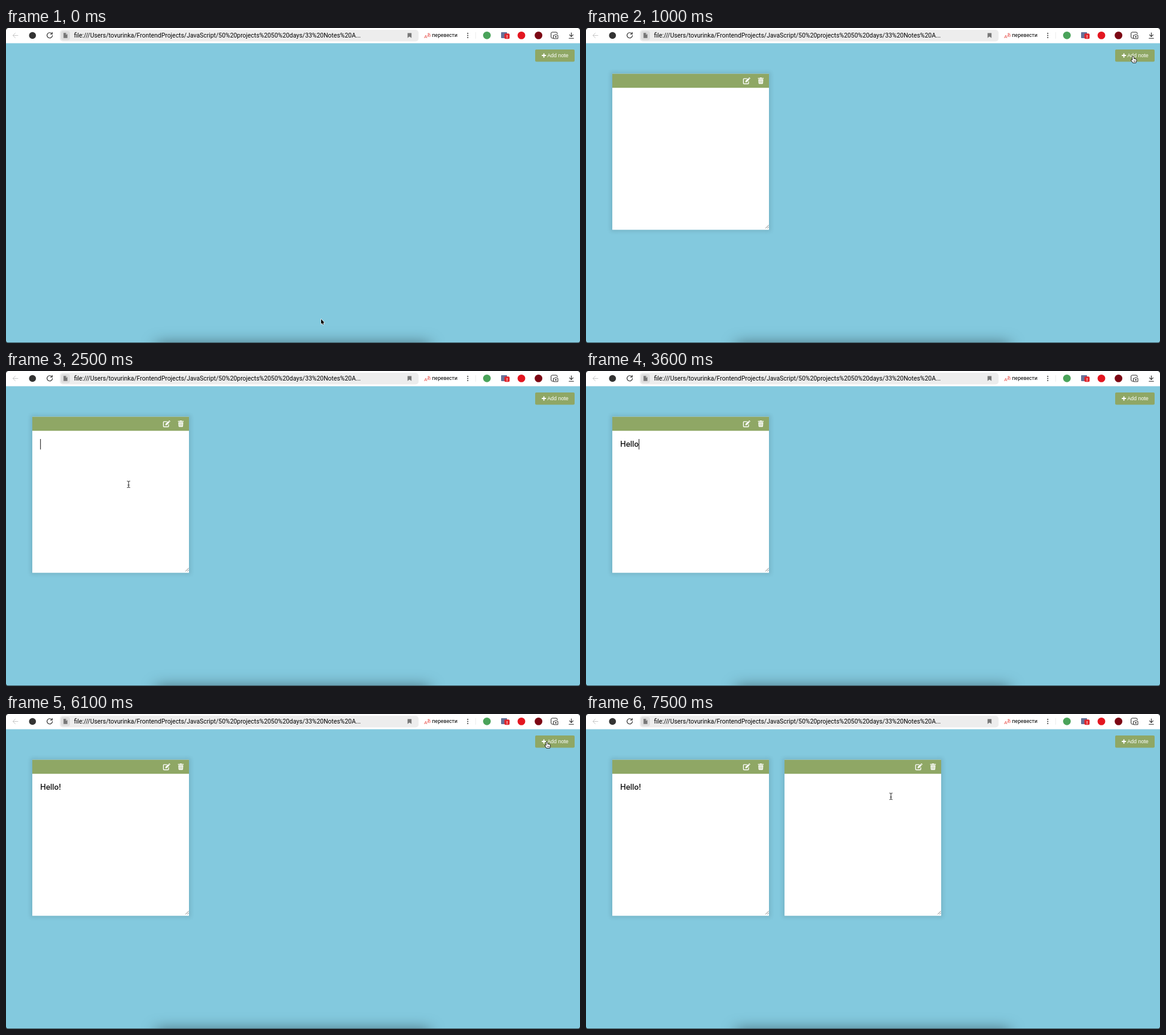
Recreate the animation shown at these times as an HTML page with a canvas. Size 960 by 528 pixels, loop 8000 ms.

```html
<!DOCTYPE html>
<html lang="en">
<head>
<meta charset="utf-8">
<title>Notes</title>
<style>
  html, body { margin: 0; width: 100%; height: 100%; overflow: hidden; background: #83c9de; }
  canvas { display: block; width: 960px; height: 528px; }
</style>
</head>
<body>
<canvas id="stage" width="960" height="528"></canvas>
<script>
const ctx = document.getElementById('stage').getContext('2d');
const LOOP = 8000, TICK = 100;
const GREEN = '#8fa765', INK = '#2b2b2b';
const UI = 'Roboto, sans-serif', NOTE_FONT = '500 12.7px Inter, sans-serif';

const NOTES = [{ x: 44, born: 1000 }, { x: 332, born: 6200 }];

// Each move: start, end, then the three control points of a quadratic curve.
const MOVES = [
  [0, 800, 527, 488, 740, 240, 915, 48],
  [1300, 1900, 915, 48, 620, 140, 225, 212],
  [1900, 2100, 225, 212, 208, 204, 205, 190],
  [4600, 4900, 205, 190, 281, 190, 480, -20],
  [5200, 6000, 600, -20, 740, 40, 904.6, 47],
  [6300, 7000, 904.6, 47, 700, 100, 510, 138]
];

const KEYS = [2700, 3000, 3200, 3400, 3600, 4200];
const GREETING = 'Hello!';

// Caret visibility as [on, off] spans.
const CARET_1 = [[2100, 2600], [2700, 4100], [4200, 4700], [5200, 5700]];
const CARET_2 = [[7000, 7500]];

const within = (t, spans) => spans.some(([a, b]) => t >= a && t < b);

function box(x, y, w, h, color, r = 0) {
  ctx.fillStyle = color;
  ctx.beginPath();
  ctx.roundRect(x, y, w, h, r);
  ctx.fill();
}

// Shadow alone: the casting box sits off stage.
function glow(x, y, w, h, blur, color) {
  ctx.save();
  ctx.shadowColor = color;
  ctx.shadowBlur = blur;
  ctx.shadowOffsetX = 2000;
  box(x - 2000, y, w, h, '#000');
  ctx.restore();
}

function disc(x, y, r, color) {
  ctx.fillStyle = color;
  ctx.beginPath();
  ctx.arc(x, y, r, 0, Math.PI * 2);
  ctx.fill();
}

function text(str, x, y, font, color) {
  ctx.font = font;
  ctx.fillStyle = color;
  ctx.fillText(str, x, y);
}

function line(d, color, width = 1.1, x = 0, y = 0) {
  ctx.save();
  ctx.translate(x, y);
  ctx.strokeStyle = color;
  ctx.lineWidth = width;
  ctx.lineJoin = ctx.lineCap = 'round';
  ctx.stroke(new Path2D(d));
  ctx.restore();
}

function shape(d, fill, x, y, outline, width = 1) {
  ctx.save();
  ctx.translate(x, y);
  const path = new Path2D(d);
  if (outline) {
    ctx.strokeStyle = outline;
    ctx.lineWidth = width;
    ctx.lineJoin = 'round';
    ctx.stroke(path);
  }
  ctx.fillStyle = fill;
  ctx.fill(path, 'evenodd');
  ctx.restore();
}

function drawToolbar() {
  box(0, 0, 960, 25.5, '#fff');
  line('M20 12.5H11.5M15.5 8.5L11.5 12.5L15.5 16.5', '#c9c9c9', 1);
  disc(44.3, 12.5, 5.8, '#333');
  line('M76.4 9.2A4.5 4.5 0 1 0 77.6 12.6M77.3 7.3V10.3H74.3', INK, 1.1);

  box(90, 3, 600, 19.5, '#ededed', 5);
  box(92, 5, 15, 15.5, '#dedede', 4);
  shape('M0 0H4L6.5 2.5V8.5H0ZM3.8 .6V2.8H6Z', '#777', 96.2, 8.2);
  text('file:///Users/tovurinka/FrontendProjects/JavaScript/50%20projects%2050%20days/33%20Notes%20A...',
    113.7, 16.4, '10.42px ' + UI, '#000');
  shape('M0 0H6.6V8.4L3.3 5.8L0 8.4Z', '#777', 671.6, 8.4);

  text('A', 699.2, 17, '8px ' + UI, '#e5453f');
  text('あ', 703.8, 14, '7px "Noto Sans CJK JP", "Noto Sans CJK", sans-serif', '#e5453f');
  text('перевести', 712.6, 15.4, '8.7px ' + UI, '#000');
  for (const y of [9, 12.5, 16]) disc(772.3, y, 0.95, INK);
  box(785, 7, 1, 11, '#eee');

  disc(804.3, 12.3, 6.4, '#4aa35a');
  box(828, 7, 10, 10, '#66739a', 1);
  box(833.5, 9.3, 8.8, 9, '#e0262c', 2);
  text('!', 836.9, 16.7, 'bold 7.5px ' + UI, '#fff');
  disc(862, 12.4, 6.4, '#e3151f');
  disc(890.6, 12.4, 6.4, '#7c0613');

  line('M915 17H913.5Q911.6 17 911.6 15V9Q911.6 7 913.6 7H920Q922 7 922 9V10', INK, 1);
  line('M916 12.2H917.5L918.3 11.2H920.7L921.5 12.2H923V17.8H916Z', INK, 1);
  disc(919.5, 14.8, 1.2, INK);
  line('M945.5 8V14.2M942.5 11.4L945.5 14.4L948.5 11.4M941.7 17.3H949.3', INK, 1.1);
}

function drawButton() {
  box(885, 36, 66, 20.5, GREEN, 2);
  box(896, 45.1, 7.2, 1.9, '#fff', 0.5);
  box(898.65, 42.4, 1.9, 7.3, '#fff', 0.5);
  text('Add note', 905.2, 49.2, '8.9px "Liberation Sans", Arial, sans-serif', '#fff');
}

function drawNote(x) {
  glow(x - 2.6, 74.2, 267.2, 266.6, 6.6, 'rgba(0,0,0,.1)');
  box(x, 76.8, 262, 261.4, '#fff');
  box(x, 76.8, 262, 23.4, GREEN);

  line('M6.3 1.8H1.6Q.7 1.8 .7 2.7V9.6Q.7 10.5 1.6 10.5H8.4Q9.3 10.5 9.3 9.6V7', '#fff', 1.3, x + 218.6, 83);
  shape('M4 5.6L8.6 1L10.7 3.1L6.1 7.7L3.7 8ZM9.2 .5L9.8 0Q10.3-.4 10.8 .1L11.7 1Q12.1 1.5 11.7 2L11.2 2.5Z',
    '#fff', x + 218.8, 83);
  shape('M0 .8H3L3.5 0H6L6.5 .8H9.5V2.1H0ZM.7 2.8H8.8L8.4 9.8Q8.3 10.8 7.3 10.8H2.2Q1.2 10.8 1.1 9.8Z' +
    'M2.6 4.2V9.4H3.2V4.2ZM4.45 4.2V9.4H5.05V4.2ZM6.3 4.2V9.4H6.9V4.2Z', '#fff', x + 243.6, 83);
  line('M256.5 335.5L261.3 330.7M259.5 335.5L261.3 333.7', '#666', 0.8, x);
}

function drawCaret(x) {
  box(x, 114, 1, 17.6, '#111');
}

function drawText(t) {
  const typed = GREETING.slice(0, KEYS.filter(k => t >= k).length);
  text(typed, 57.2, 127.4, NOTE_FONT, '#000');
  if (within(t, CARET_1)) drawCaret(57.2 + ctx.measureText(typed).width);
  if (within(t, CARET_2)) drawCaret(345.3);
}

function pointerAt(t) {
  const [a, b, x0, y0, x1, y1, x2, y2] = MOVES.filter(m => t >= m[0]).pop();
  const p = Math.min(1, (t - a) / (b - a));
  const e = p * p * (3 - 2 * p), r = 1 - e;
  const mix = (u, v, w) => r * r * u + 2 * r * e * v + e * e * w;
  return [mix(x0, x1, x2), mix(y0, y1, y2)];
}

function drawPointer(t) {
  if (t >= 2700 && t < 4700) return;
  const [x, y] = pointerAt(t);
  const onButton = x > 885 && x < 951 && y > 36 && y < 57;
  const onPaper = NOTES.some(n => t >= n.born && x > n.x && x < n.x + 262 && y > 100 && y < 338);
  if (onButton) {
    shape('M-.9.8Q-.9-.1 0-.1Q.9-.1.9.8V3.8Q1.6 3.2 2.4 4Q3.2 3.5 3.9 4.4Q5.5 4.1 5.5 5.7V7.3L4.5 10H-.2' +
      'L-2.7 6.8Q-3.3 5.7-2.3 5.3Q-1.6 5.2-.9 6Z', '#fff', x, y, '#000', 1.5);
    line('M1.1 6.8V8.6M2.5 6.8V8.6M3.8 6.8V8.6', '#000', 0.5, x, y);
  } else if (onPaper) {
    const beam = 'M-2.2-5.4Q-.4-5.4 0-4.5Q.4-5.4 2.2-5.4M0-4.5V4.5M-2.2 5.4Q-.4 5.4 0 4.5Q.4 5.4 2.2 5.4M-1.1 1.2H1.1';
    line(beam, '#fff', 1.7, x, y);
    line(beam, '#111', 0.9, x, y);
  } else {
    shape('M0 0V8L1.8 6.4L3 9.2L4.4 8.6L3.2 5.9H5.6Z', '#000', x, y, '#fff', 1.3);
  }
}

function drawWindowEdge() {
  glow(252, 529.5, 456, 20, 24, 'rgba(0,0,0,.5)');
  box(0, 527, 960, 1, '#3d565f');
  ctx.fillStyle = '#252a2d';
  ctx.beginPath();
  ctx.rect(0, 0, 960, 528);
  ctx.roundRect(0, 0, 960, 528, 4.5);
  ctx.fill('evenodd');
}

function draw(t) {
  box(0, 0, 960, 528, '#83c9de');
  drawToolbar();
  drawButton();
  for (const n of NOTES) if (t >= n.born) drawNote(n.x);
  drawText(t);
  drawWindowEdge();
  drawPointer(t);
}

function frame() {
  const t = performance.now() % LOOP;
  draw(Math.floor(t / TICK) * TICK);
  requestAnimationFrame(frame);
}
frame();
</script>
</body>
</html>
```
